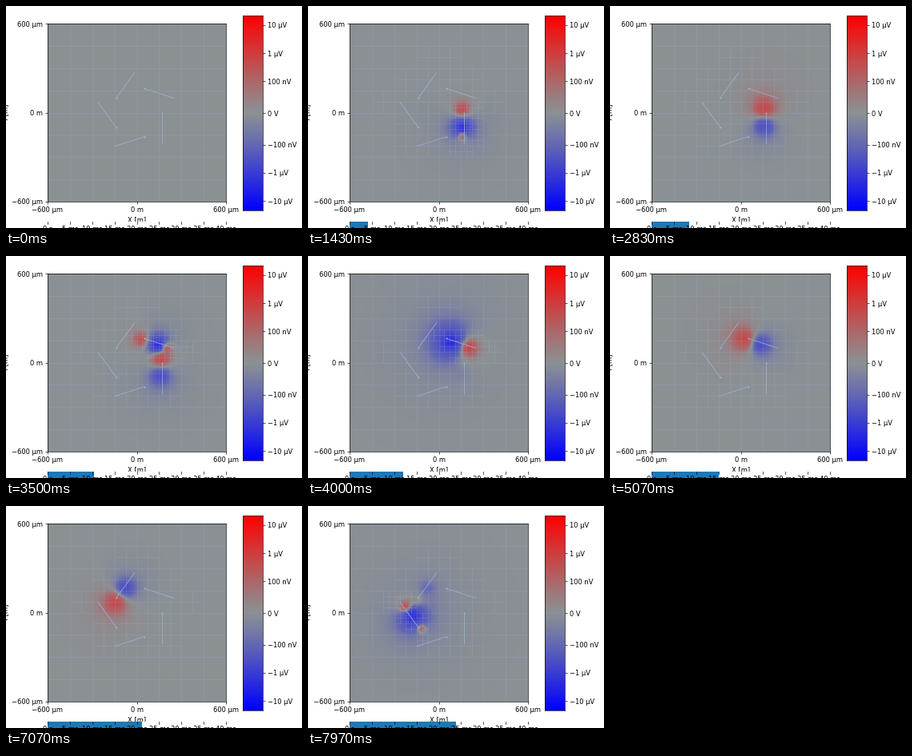
A matplotlib script that plays this animation: 370 px wide and 278 px high, repeating every 8 s.

```python
import numpy as np
import matplotlib.pyplot as plt
from matplotlib.animation import FuncAnimation
from matplotlib.collections import LineCollection
from matplotlib.colors import LinearSegmentedColormap
from matplotlib.patches import Rectangle

W, H, DPI = 370, 278, 60
FRAMES, INTERVAL = 200, 40
HALF = 600                      # half width of the domain, um
RING, AXON = 170, 210           # ring radius and axon length, um
MS_PER_SECOND = 3               # simulated ms per second of playback
ONSETS = 1.36 + 2.055 * np.arange(4) - [0, 0.03, 0, 0]
MESH = (0.64, 0.70, 0.86)
GRAY = np.array([0.545, 0.567, 0.58])


def half_map(colour):
    """Ramp from gray to a pure colour, a little muted in the middle."""
    mix = np.linspace(0, 1, 65)[:, None] ** 1.12
    return GRAY + (np.array(colour) - GRAY) * mix


cmap = LinearSegmentedColormap.from_list(
    "potential", np.vstack([half_map((0, 0, 1))[::-1], half_map((1, 0, 0))[1:]]))


def level(v):
    """Symmetric log scale of a potential in nV, mapped to -1..1."""
    x = np.abs(v) / 100
    log_part = 0.324 + 0.289 * np.log10(np.maximum(x, 1))
    return np.sign(v) * np.where(x < 1, 0.324 * x, log_part)


def ease(t, start, end):
    u = np.clip((t - start) / (end - start), 0, 1)
    return u * u * (3 - 2 * u)


def sources(age):
    """Place along the axon (um), strength (nV) and radius (um) of each source."""
    fire = ease(age, 0, 0.04) * (1 - ease(age, 0.64, 0.9))
    release = ease(age, 0.53, 0.61)
    rest = ease(age, 0.62, 0.95) * (1 - ease(age, 2.05, 2.9)) ** 2
    return [
        (-18 + 20 * release, 600 * fire * (1 - release), max(26 - 30 * age, 8)),
        (100 - 40 * age - 45 * release, -3500 * fire, 16 + 16 * age),
        (158, (600 + 300 * age) * fire, 13 + 28 * age),
        (-27, 580 * rest, 40),
        (86, -500 * rest, 40),
    ]


# Axons around the ring: tip, direction to the tail, outward normal
angles = np.radians(72 * np.arange(5))
normals = np.column_stack([np.cos(angles), np.sin(angles)])
dirs = np.column_stack([np.sin(angles), -np.cos(angles)])
tips = RING * normals
tails = tips + AXON * dirs

nodes = np.linspace(-HALF, HALF, 65)
gx, gy = np.meshgrid(nodes, nodes)


def potential(t):
    v = np.zeros_like(gx)
    for k, onset in enumerate(ONSETS):
        if not 0 < t - onset < 2.9:
            continue
        for s, q, a in sources(t - onset):
            x, y = tips[k] + s * dirs[k] - 12 * normals[k]
            v += q * a**2 / ((gx - x)**2 + (gy - y)**2 + a**2)
    return v


def axon_distance(p, k):
    s = np.clip((p - tips[k]) @ dirs[k], 0, AXON)
    return np.hypot(*(p - tips[k] - s * dirs[k]))


def splits(cell, reach, axons):
    """Crosses that divide the cells of one size lying near the axons."""
    segs = []
    centres = np.arange(-HALF + cell / 2, HALF, cell)
    r = cell / 2
    for x in centres:
        for y in centres:
            p = np.array([x, y])
            if min(axon_distance(p, k) for k in axons) < reach:
                segs += [[(x - r, y), (x + r, y)], [(x, y - r), (x, y + r)]]
    return segs


def pixel_axes(x0, y0, x1, y1):
    return fig.add_axes([x0 / W, 1 - y1 / H, (x1 - x0) / W, (y1 - y0) / H])


plt.rcParams["font.family"] = "DejaVu Sans"
plt.rcParams["font.size"] = 10
fig = plt.figure(figsize=(W / DPI, H / DPI), dpi=DPI, facecolor="white")

# Field
ax = pixel_axes(52, 22, 275, 245)
edge = HALF + (nodes[1] - nodes[0]) / 2
image = ax.imshow(np.zeros_like(gx), cmap=cmap, vmin=-1, vmax=1, origin="lower",
                  extent=(-edge, edge, -edge, edge), aspect="auto",
                  interpolation="bilinear")
ax.set(xlim=(-HALF, HALF), ylim=(-HALF, HALF), xlabel="X [m]", ylabel="Y [m]")
marks, names = (-HALF, 0, HALF), ("−600 µm", "0 m", "600 µm")
ax.set_xticks(marks, names)
ax.set_yticks(marks, names)


def add_lines(segs, color, width, alpha):
    return ax.add_collection(
        LineCollection(segs, colors=[color], linewidths=width, alpha=alpha))


base = np.arange(-HALF + 150, HALF, 150)
add_lines([[(x, -HALF), (x, HALF)] for x in base]
          + [[(-HALF, y), (HALF, y)] for y in base], MESH, 0.8, 0.28)
medium = add_lines(splits(150, 150, range(5)), MESH, 0.8, 0.3)
fine = [add_lines(splits(75, 100, [k]), MESH, 0.8, 0.33)
        for k in range(len(ONSETS))]
finest = [add_lines(splits(37.5, 42, [k]), MESH, 0.8, 0.18)
          for k in range(len(ONSETS))]

add_lines(np.stack([tips, tails], axis=1), (0.63, 0.69, 0.83), 1.1, 0.85)
ax.plot(*tips.T, "o", ms=2.4, mew=0, color=(0.64, 0.70, 0.84))

# Colour scale
scale = pixel_axes(296, 12, 321, 256)
scale.imshow(np.linspace(-1, 1, 256)[:, None], cmap=cmap, origin="lower",
             extent=(0, 1, -1, 1), aspect="auto")
scale.set_xticks([])
scale.yaxis.tick_right()
volts = np.array([-10000, -1000, -100, 0, 100, 1000, 10000])
scale.set_yticks(level(volts), ["−10 µV", "−1 µV", "−100 nV", "0 V",
                                "100 nV", "1 µV", "10 µV"])

# Time bar, running off the lower edge
clock = pixel_axes(52, 270, 275, 290)
clock.set(xlim=(0, 40), ylim=(20, 0), xticks=[], yticks=[])
clock.spines[:].set_visible(False)
bar = clock.add_patch(Rectangle((0, 0), 0, 20, color="tab:blue", lw=0))
for ms in range(0, 41, 5):
    clock.plot([ms, ms], [0, 2.9], color="black", lw=0.8, clip_on=False)
    clock.text(ms, 5, f"{ms} ms" if ms else "0 s", ha="center", va="top")


def update(i):
    t = i * INTERVAL / 1000
    image.set_data(level(potential(t)))
    bar.set_width(MS_PER_SECOND * t)
    medium.set_visible(t > ONSETS[0])
    for k, onset in enumerate(ONSETS):
        fine[k].set_visible(0 < t - onset < 0.95)
        finest[k].set_visible(0 < t - onset < 0.5)
    return [image, bar, medium, *fine, *finest]


anim = FuncAnimation(fig, update, frames=FRAMES, interval=INTERVAL,
                     repeat=True, repeat_delay=0, blit=False)
plt.show()
```
